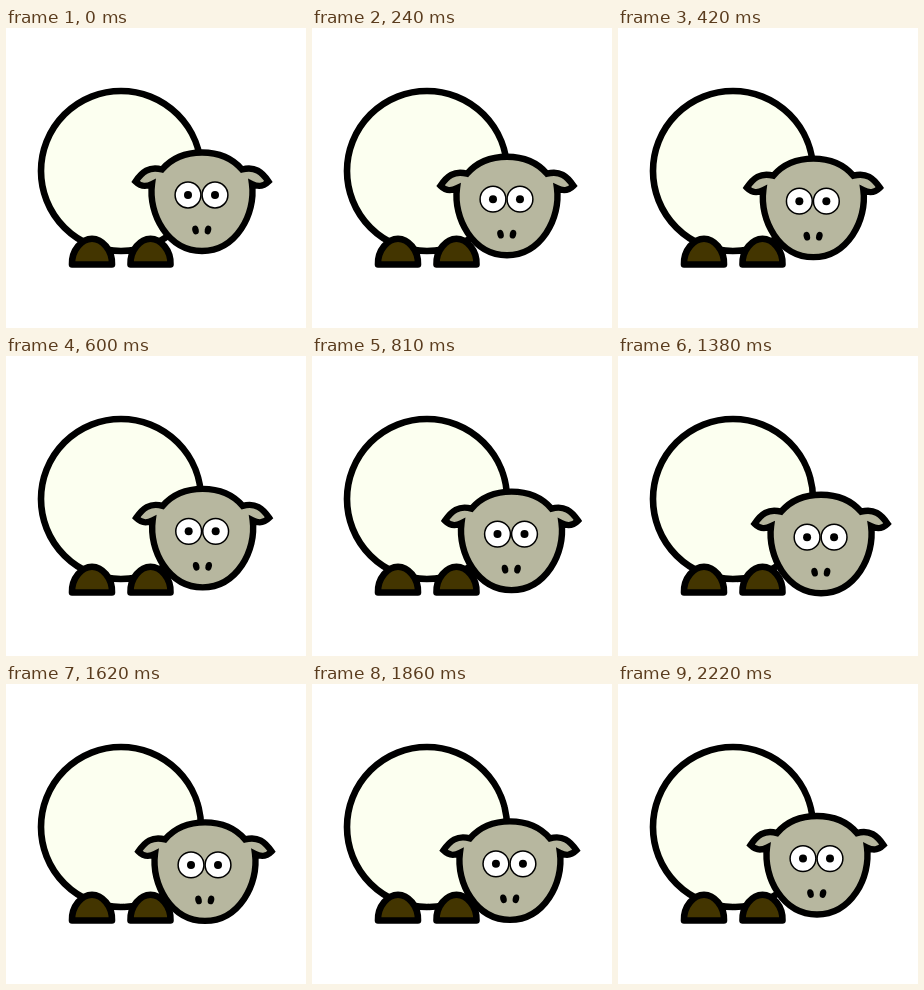
Write an HTML page that moves like this. It is 300 by 300 pixels and loops after 2250 ms.

```html
<!DOCTYPE html>
<html lang="en">
<head>
<meta charset="utf-8">
<title>Grazing sheep</title>
<style>
  html, body { margin: 0; height: 100%; overflow: hidden; background: #fff; }
  svg { display: block; width: 100vw; height: 100vh; }
</style>
</head>
<body>
<svg viewBox="0 0 300 300">
  <defs>
    <path id="foot" d="M66 236.5C65.5 222 76 210.7 86 210.7C96 210.7 106.5 222 106 236.5Z"/>
    <g id="eye">
      <circle r="12.9" fill="#fff" stroke="#000" stroke-width="1.5"/>
      <circle r="4"/>
    </g>
    <ellipse id="nostril" rx="3.2" ry="4.4"/>
  </defs>
  <g stroke="#000" stroke-width="6.6" stroke-linejoin="round">
    <circle cx="115" cy="143" r="80" fill="#fcfff0"/>
    <g fill="#433500">
      <use href="#foot"/>
      <use href="#foot" x="58.5"/>
    </g>
  </g>
  <g id="head">
    <path fill="#b7b79f" stroke="#000" stroke-width="6.4"
      d="M196 124.5C213 124.5 227 131 236 141.5C249 138 256 144 262.5 153.5C257 159 252 159 246 156
         C250 186 230 223 196 223C162 223 142 186 146 156C140 159 135 159 129.5 153.5
         C136 144 143 138 156 141.5C165 131 179 124.5 196 124.5Z"/>
    <use href="#eye" x="182" y="167"/>
    <use href="#eye" x="209" y="167"/>
    <use href="#nostril" transform="translate(189.5 202) rotate(-14)"/>
    <use href="#nostril" transform="translate(202 202) rotate(14)"/>
  </g>
</svg>
<script>
  const LOOP = 2250, STEP = 30;
  const head = document.getElementById('head');

  // Head offsets at evenly spaced moments of the loop
  const xs = [0, -1, -0.5, 1.5, 5, 8.8, 7.5, 3.5, 2, 2.3, 3.1];
  const ys = [0, 4, 6.5, 9.3, 12.2, 14, 14.2, 14, 13.3, 11, 7];

  // Catmull-Rom curve through the points, u in 0..1
  function curve(points, u) {
    const last = points.length - 1;
    const i = Math.min(last - 1, Math.floor(u * last));
    const f = u * last - i;
    const b = points[i], c = points[i + 1];
    const a = points[i - 1] ?? 2 * b - c;
    const d = points[i + 2] ?? 2 * c - b;
    return b + f / 2 * (c - a + f * (2 * a - 5 * b + 4 * c - d + f * (3 * (b - c) + d - a)));
  }

  function draw() {
    const t = performance.now() % LOOP;
    const u = Math.floor(t / STEP) * STEP / LOOP;
    head.setAttribute('transform', `translate(${curve(xs, u)} ${curve(ys, u)})`);
    requestAnimationFrame(draw);
  }
  draw();
</script>
</body>
</html>
```
